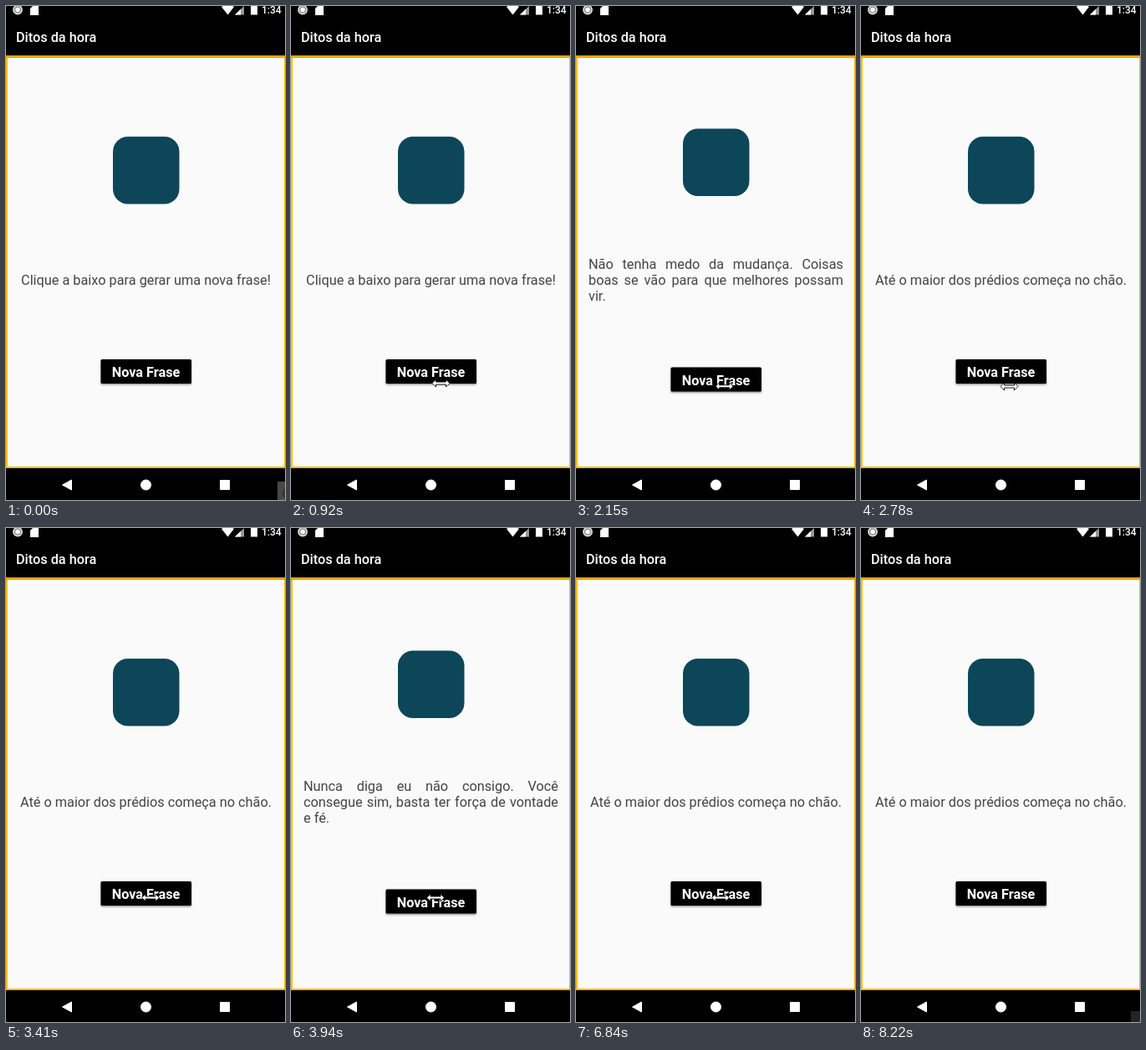
An HTML page for the animation above (8300 ms loop, 334 px wide and 590 px high).

```html
<!DOCTYPE html>
<html lang="pt">
<head>
<meta charset="utf-8">
<style>
  html, body { margin: 0; width: 100%; height: 100%; overflow: hidden; background: #000; }
  svg { position: absolute; left: 0; top: 0; }
  text { font-family: Roboto, sans-serif; font-size: 16.25px; fill: #fff; }
  #phrase {
    position: absolute; left: 15px; width: 305px;
    font: 16.3px/19px Roboto, sans-serif; color: #444; white-space: nowrap;
  }
  #phrase div { text-align: justify; text-align-last: justify; }
  #phrase div:last-child { text-align-last: left; }
  #phrase div:only-child { margin: 0 -10px; text-align-last: center; }
</style>
</head>
<body>
<svg width="334" height="590">
  <defs>
    <filter id="shadow" x="-10%" y="-20%" width="120%" height="150%">
      <feDropShadow dx="0" dy="1.3" stdDeviation="1" flood-opacity=".45"/>
    </filter>
  </defs>
  <rect width="334" height="590"/>

  <!-- status bar -->
  <circle cx="14" cy="4.500" r="5" fill="#888" stroke="#ddd" stroke-width="1.8"/>
  <circle cx="14" cy="4.500" r="2.800" fill="#fff"/>
  <path d="M29 3 32 0H39V11H29Z" fill="#fff"/>
  <path d="M258 1Q265.500 -4 273 1L265.500 10.500Z" fill="#fff"/>
  <path d="M274 10.500 285 0V10.500Z" fill="#999"/>
  <path d="M274 10.500 281 3.800V10.500Z" fill="#fff"/>
  <path d="M293 0H301V10.500H293Z" fill="#fff"/>
  <text x="306" y="9" style="font-size:12px;font-weight:500">1:34</text>
  <text x="12" y="43" font-weight="500">Ditos da hora</text>

  <!-- page -->
  <rect y="59" width="334" height="493" fill="#ffc107"/>
  <rect y="59" width="334" height="3" fill="#e9a60c"/>
  <rect x="2" y="62" width="331" height="488" fill="#fafafa"/>
  <rect id="icon" x="128" y="156" width="79.500" height="80.500" rx="18" fill="#0d4658"/>
  <g id="button">
    <rect x="113.500" y="422" width="108.500" height="29" rx="1.500" filter="url(#shadow)"/>
    <text x="167.500" y="443" font-weight="700" text-anchor="middle">Nova Frase</text>
  </g>

  <!-- navigation bar -->
  <g fill="#fff" stroke="#fff" stroke-linejoin="round">
    <path d="M67.500 572 78.500 566V578Z"/>
    <circle cx="167.500" cy="572" r="6"/>
    <rect x="256.500" y="566.500" width="11" height="11"/>
  </g>
</svg>
<div id="phrase"></div>
<svg width="334" height="590">
  <g id="cornerStart">
    <rect x="325" y="568" width="9" height="22" fill="#484848"/>
    <path d="M334 577Q329.500 582 334 587" fill="none" stroke="#181818"/>
  </g>
  <rect id="cornerEnd" x="323" y="577" width="11" height="13" fill="#242424"/>
  <path id="cursor" d="M-10.500 0 -6 -4.500V-1.500H6V-4.500L10.500 0 6 4.500V1.500H-6V4.500Z"
        fill="#fff" stroke="#000" stroke-width=".9"/>
</svg>
<script>
const LOOP = 8300, ENTER = 70, LEAVE = 7220, CORNER = 8220;
const STEP = 80;    // the pointer is sampled this often
const LINE = 19;
const $ = id => document.getElementById(id);

const tall = 'Até o maior dos prédios começa no chão.';
const phrases = [
  { start: 0, text: 'Clique a baixo para gerar uma nova frase!' },
  { start: 1620, text: 'Não tenha medo da mudança. Coisas|boas se vão para que melhores possam|vir.' },
  { start: 2780, text: tall },
  { start: 3940, text: 'Nunca diga eu não consigo. Você|consegue sim, basta ter força de vontade|e fé.' },
  { start: 5420, text: 'Que a minha coragem seja sempre mais|forte do que a tentação de parar e|desistir.' },
  { start: 6840, text: tall }
];

// Each glide brings the pointer to x, y within a few samples.
const glides = [
  { start: ENTER, steps: 3, x: 216, y: 495 },
  { start: 450, steps: 3, x: 190.5, y: 447 },
  { start: 760, steps: 3, x: 179.5, y: 450.5 },
  { start: 1920, steps: 4, x: 177.5, y: 454.5 },
  { start: 3240, steps: 3, x: 173, y: 441.5 },
  { start: 7140, steps: 1, x: 266, y: 534.5 }
];

const easeOut = p => 1 - (1 - p) ** 2;
const show = (id, on) => $(id).style.display = on ? '' : 'none';
const shift = (id, x, y) => $(id).setAttribute('transform', `translate(${x} ${y})`);
let shown;

function setPhrase(text) {
  if (text === shown) return;
  shown = text;
  const lines = text.split('|');
  const spread = (lines.length - 1) * LINE / 4;
  $('phrase').innerHTML = lines.map(line => `<div>${line}</div>`).join('');
  $('phrase').style.top = 327.5 - lines.length * LINE / 2 + 'px';
  shift('icon', 0, -spread);
  shift('button', 0, spread);
}

function pointer(t) {
  let x = 334, y = 590;
  for (const g of glides) {
    if (t < g.start) break;
    const sample = Math.floor((t - g.start) / STEP) + 1;
    const p = easeOut(Math.min(1, sample / g.steps));
    x += (g.x - x) * p;
    y += (g.y - y) * p;
  }
  return [x, y];
}

function draw() {
  const t = performance.now() % LOOP;
  setPhrase(phrases.findLast(phrase => phrase.start <= t).text);
  shift('cursor', ...pointer(t));
  show('cursor', t >= ENTER && t < LEAVE);
  show('cornerStart', t < ENTER);
  show('cornerEnd', t >= CORNER);
  requestAnimationFrame(draw);
}
draw();
</script>
</body>
</html>
```
